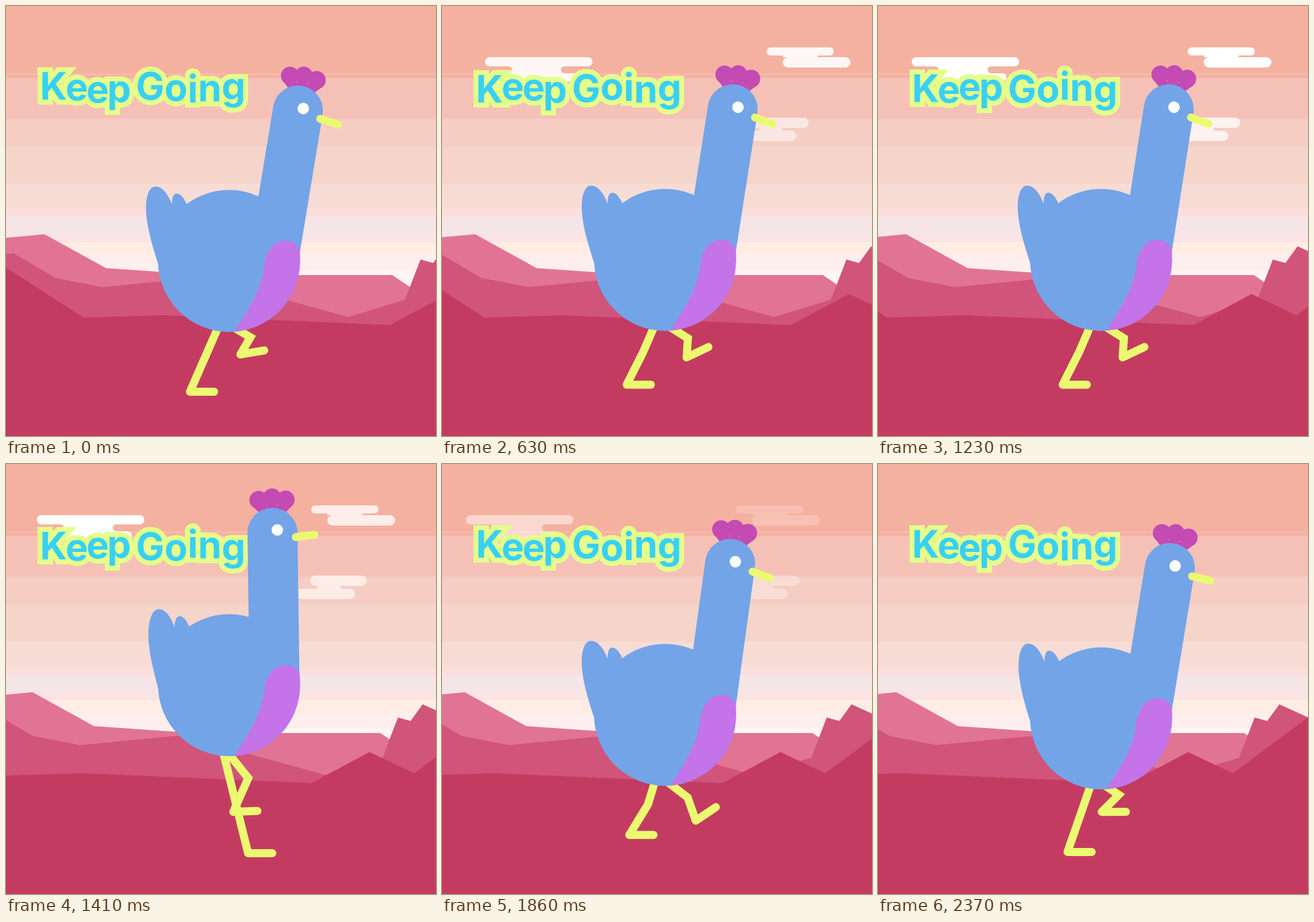
An HTML page with a canvas for the animation above (2400 ms loop, 748 px wide and 748 px high).

```html
<!DOCTYPE html>
<html lang="en">
<head>
<meta charset="utf-8">
<title>Keep Going</title>
<style>
  html, body { margin: 0; height: 100%; overflow: hidden; }
  canvas { display: block; width: 748px; height: 748px; }
</style>
</head>
<body>
<canvas id="stage" width="748" height="748"></canvas>
<script>
const ctx = document.getElementById('stage').getContext('2d');
const LOOP = 2400, STEP = 600, FRAME = 30, SIZE = 748;
const BLUE = '#73a4e8', YELLOW = '#ebfa70', PLUM = '#c44ab4';

// Sky: top edge and colour of each band
const sky = [
  [0, '#f5b1a0'], [118, '#f8c4b4'], [119.5, '#f5b1a0'], [125, '#f5c1b7'], [196, '#f5cdc2'], [244, '#f5d5ca'],
  [309, '#f7dcd5'], [351, '#fcdedc'], [366, '#f5e5e6'], [399, '#fbe4e3'], [411, '#ffede4'], [433, '#ffeeee'], [460, '#fff5f2']
];

// Hills: speed in px/ms and ridge line
const hills = [
  { color: '#e17494', speed: .0148, ridge: 'M-20 748V405L67 397 174 456 350 468H672L760 528 820 748Z' },
  { color: '#d1547b', speed: .0278, ridge: 'M-20 748V434L13 430 86 473 168 489 345 472 595 541 694 511 721 441 743 447 764 418 900 480V748Z' },
  { color: '#c43b62', speed: .0969, ridge: 'M-20 748V442L135 542 271 538 668 555 769 501 847 538 1000 424V748Z' }
].map(hill => ({ ...hill, ridge: new Path2D(hill.ridge) }));

// Clouds: fade-in time, end and length of the fade-out, pills [x, y, w, h], bridge [x1, x2, y, h]
const clouds = [
  { speed: .0272, alpha: 1, fadeIn: 700, end: 2260, fadeOut: 790,
    pills: [[92, 89, 187, 16], [117, 117, 140, 14]], bridge: [133, 230, 105, 12] },
  { speed: .0434, alpha: 1, fadeIn: 700, end: 2000, fadeOut: 750,
    pills: [[592, 72, 117, 14], [620, 89, 118, 18]], bridge: [619, 682, 86, 3] },
  { speed: .0128, alpha: .85, fadeIn: 1000, end: 2330, fadeOut: 1250,
    pills: [[547, 194, 99, 18], [523, 217, 102, 18]], bridge: [558, 602, 212, 5] }
];

// Shapes relative to the body centre; the tail to its root
const tail = new Path2D('M0 0C-15-45-22-75-22-98C-22-122-15-135-6-135C6-135 16-122 23-104C23-115 25-123 31-123C38-123 44-115 49-104L123-6Z');
const chest = new Path2D('M9 123C37 81 57 46 61 11C64-19 80-35 97-35C112-35 123.5-26 123.5-12V0A123.5 123.5 0 0 1 9 123Z');

const words = [{ text: 'Keep', x: 59, spacing: -3 }, { text: 'Going', x: 226, spacing: 0 }];

const clamp = v => Math.min(1, Math.max(0, v));
const mix = (a, b, u) => a + (b - a) * u;
const ease = u => (1 - Math.cos(Math.PI * u)) / 2;
const hump = u => Math.sin(Math.PI * u);
const swing = (t, peak) => Math.cos(2 * Math.PI * (t - peak) / STEP);
const rad = deg => deg * Math.PI / 180;

// Slow push up, quicker drop down
function lift(t) {
  const u = t % STEP / STEP * 2;
  return u < 1 ? ease(u) : 1 - ease((u - 1) ** .7);
}

function disc(x, y, r, color) {
  ctx.fillStyle = color;
  ctx.beginPath();
  ctx.arc(x, y, r, 0, 2 * Math.PI);
  ctx.fill();
}

function line(points, width, color, cap = 'round') {
  ctx.strokeStyle = color;
  ctx.lineWidth = width;
  ctx.lineCap = cap;
  ctx.lineJoin = 'miter';
  ctx.beginPath();
  points.forEach(([x, y]) => ctx.lineTo(x, y));
  ctx.stroke();
}

function drawSky() {
  sky.forEach(([y, color]) => {
    ctx.fillStyle = color;
    ctx.fillRect(0, y, SIZE, SIZE - y);
  });
}

function drawCloud({ speed, alpha, fadeIn, end, fadeOut, pills, bridge: [x1, x2, y, h] }, t) {
  const r = h / 2, top = -Math.PI / 2, bottom = Math.PI / 2;
  ctx.save();
  ctx.globalAlpha = alpha * Math.min(clamp(t / fadeIn), clamp((end - t) / fadeOut));
  ctx.translate(-speed * t, 0);
  ctx.fillStyle = '#fff';
  ctx.beginPath();
  pills.forEach(([x, py, w, ph]) => ctx.roundRect(x, py, w, ph, ph / 2));
  // Bridge with hollow ends
  ctx.moveTo(x1, y);
  ctx.arc(x2, y + r, r, top, bottom, true);
  ctx.arc(x1, y + r, r, bottom, top, true);
  ctx.fill();
  ctx.restore();
}

function drawHill({ color, speed, ridge }, t) {
  ctx.save();
  ctx.translate(-speed * t, 0);
  ctx.fillStyle = color;
  ctx.fill(ridge);
  ctx.restore();
}

// Each letter bobs a little later than the one before
function drawText(t) {
  ctx.font = '700 66px Inter, sans-serif';
  ctx.lineJoin = 'miter';
  ctx.miterLimit = 3;
  ctx.lineWidth = 17;
  ctx.strokeStyle = '#e5ff8a';
  ctx.fillStyle = '#38d0f5';
  for (const method of ['strokeText', 'fillText']) {
    let i = 0;
    for (const { text, x, spacing } of words) {
      let pen = x;
      for (const char of text) {
        const bob = Math.cos(2 * Math.PI * (t + 300 - 638 * i++) / LOOP);
        ctx[method](char, pen, 165.5 - 3 * bob);
        pen += ctx.measureText(char).width + spacing;
      }
    }
  }
}

// Foot slides back on the ground, then swings forward with a bent knee
function drawLeg(t, hipY) {
  const ground = 210, air = STEP - ground, hipX = 374.5;
  const time = (t + STEP) % STEP;
  let x, y, bend = 0, toe = 0;
  if (time < ground) {
    const u = time / ground;
    x = mix(320, 468, (1 - u) ** 1.4);
    y = 671 + 9 * hump(u);
  } else {
    const u = (time - ground) / air, late = u ** 1.1;
    x = mix(320, 468, ease(late));
    y = 671 - 66 * hump(late);
    bend = 37 * hump(u) ** 2;
    toe = rad(-34) * hump(clamp(2 * u - 1)) ** 2;
  }
  const knee = [(hipX + x) / 2 + bend, (hipY + y) / 2];
  line([[hipX, hipY], knee, [x, y]], 14, YELLOW, 'butt');
  line([[x, y], [x + 42 * Math.cos(toe), y + 42 * Math.sin(toe)]], 14, YELLOW);
}

function drawTail(t) {
  const wag = .6 + .6 * swing(t, 350);
  ctx.save();
  ctx.translate(-123, 6);
  ctx.transform(1, 0, -.074 * wag, 1 + .037 * wag, 0, 0);
  ctx.fillStyle = BLUE;
  ctx.fill(tail);
  ctx.restore();
}

function drawHead(t) {
  const neck = rad(mix(9.4, -2.8, lift(t + 10)));
  const beak = rad(-3.5 - 24 * swing(t, 345));
  ctx.save();
  ctx.translate(79, -14);
  ctx.rotate(neck);
  ctx.translate(0, -251);
  for (const side of [-1, 0, 1]) disc(23.5 * side, -61.5 + 4 * side * side, 15.8, PLUM);
  ctx.fill(new Path2D('M-35-48L0-12 36-48Z'));
  line([[0, 0], [0, 251]], 87, BLUE);
  disc(8.5, -5, 10, '#fff');
  ctx.translate(40.3, 8);
  ctx.rotate(beak - neck);
  line([[0, 0], [33, 0]], 13.5, YELLOW);
  ctx.restore();
}

function drawBird(t) {
  const y = 443.5 - 74 * lift(t);
  drawLeg(t - 390, y + 103);
  drawLeg(t - 160, y + 103);
  ctx.save();
  ctx.translate(388, y);
  drawTail(t);
  drawHead(t);
  disc(0, 0, 123.5, BLUE);
  ctx.fillStyle = '#c473e8';
  ctx.fill(chest);
  ctx.restore();
}

function draw(now) {
  const t = Math.floor(now % LOOP / FRAME) * FRAME;
  drawSky();
  clouds.forEach(cloud => drawCloud(cloud, t));
  hills.forEach(hill => drawHill(hill, t));
  drawText(t);
  drawBird(t % STEP);
}

const start = performance.now();
function tick() {
  draw(performance.now() - start);
  requestAnimationFrame(tick);
}
tick();
</script>
</body>
</html>
```
